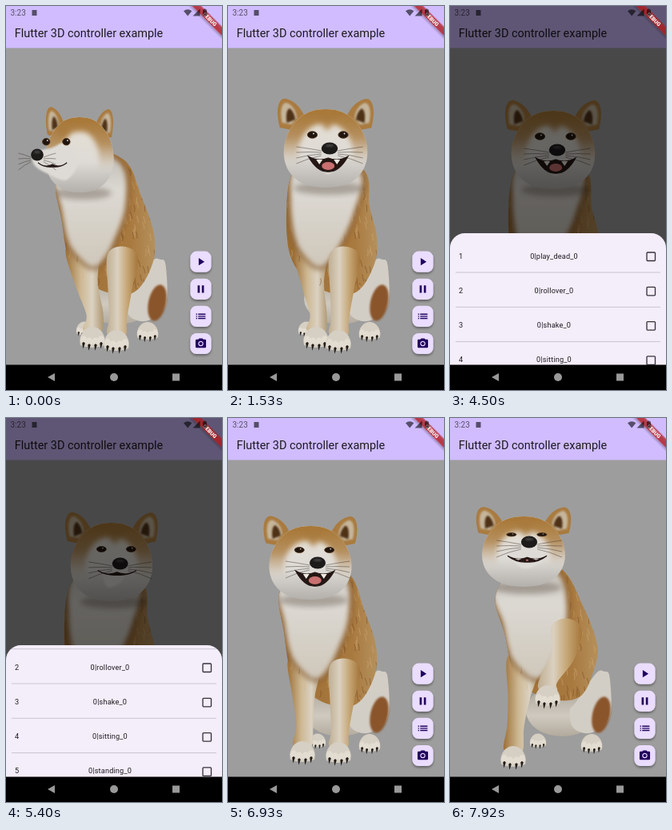
Animation, 270 px wide and 480 px high, one loop 8000 ms. Source, as an HTML page:

```html
<!DOCTYPE html>
<html lang="en">
<head>
<meta charset="utf-8">
<title>3D controller example</title>
<style>
html, body { margin: 0; width: 100%; height: 100%; overflow: hidden; background: #9d9d9d; }
svg { display: block; width: 100%; height: 100%; font-family: Roboto, sans-serif; }
</style>
</head>
<body>
<svg viewBox="0 0 270 480">
  <defs>
    <linearGradient id="coat">
      <stop offset="0" stop-color="#9c6d34"/><stop offset=".75" stop-color="#a97a40"/><stop offset="1" stop-color="#b5905c"/>
    </linearGradient>
    <linearGradient id="crown" x2="0" y2="1">
      <stop offset=".05" stop-color="#a87838"/><stop offset=".35" stop-color="#ad8148" stop-opacity=".85"/><stop offset=".7" stop-color="#b59a76" stop-opacity="0"/>
    </linearGradient>
    <linearGradient id="bib" x2="0" y2="1">
      <stop offset="0" stop-color="#bdb9b3"/><stop offset=".35" stop-color="#dcd9d3"/><stop offset="1" stop-color="#cfc7ba"/>
    </linearGradient>
    <linearGradient id="face" x2="0" y2="1">
      <stop offset="0" stop-color="#e6dfd3"/><stop offset=".6" stop-color="#dedbd6"/><stop offset="1" stop-color="#b3b0ab"/>
    </linearGradient>
    <linearGradient id="nearLeg">
      <stop offset="0" stop-color="#9d7038"/><stop offset=".4" stop-color="#cdb893"/><stop offset=".7" stop-color="#dbd2c2"/><stop offset="1" stop-color="#ae9670"/>
    </linearGradient>
    <linearGradient id="farLeg">
      <stop offset="0" stop-color="#bfae93"/><stop offset=".35" stop-color="#dbd1c0"/><stop offset=".65" stop-color="#c6a777"/><stop offset="1" stop-color="#a47539"/>
    </linearGradient>
    <linearGradient id="rump" x2="0" y2="1">
      <stop offset="0" stop-color="#aaa296"/><stop offset=".6" stop-color="#cfc9bf"/><stop offset="1" stop-color="#b3aa9d"/>
    </linearGradient>
    <filter id="soft" x="-30%" y="-30%" width="160%" height="160%"><feGaussianBlur stdDeviation="3"/></filter>
    <filter id="haze" x="-50%" y="-50%" width="200%" height="200%"><feGaussianBlur stdDeviation="1.3"/></filter>
    <filter id="drop" x="-40%" y="-40%" width="180%" height="180%"><feDropShadow dx="0" dy="2" stdDeviation="1.6" flood-opacity=".38"/></filter>
    <clipPath id="torsoClip"><path id="torsoEdge"/></clipPath>
    <clipPath id="skullClip"><path id="skullEdge"/></clipPath>
    <clipPath id="sheetClip"><rect width="270" height="230" rx="18.4"/></clipPath>
    <g id="ear">
      <path d="M-13 36C-20 10 -13 -2 -5 0C5 2 14 10 20 24L8 40Z" fill="#a97b40"/>
      <path d="M-10 30C-14 12 -9 4 -4 5C3 8 8 14 9 24L2 32Z" fill="#c5b59b" filter="url(#haze)"/>
      <path d="M-4 30C-6 18 -3 12 0 12Q6 17 7 26Z" fill="#4f3319" filter="url(#haze)"/>
    </g>
    <g id="paw"></g>
  </defs>

  <rect width="270" height="480" fill="#9d9d9d"/>

  <g id="dog">
    <use id="pawC" href="#paw"/>
    <ellipse cx="140" cy="366" rx="45" ry="32" fill="url(#rump)"/>
    <path id="rear" fill="#d3cec5"/>
    <ellipse cx="189" cy="371" rx="11" ry="23" fill="#8a552b" filter="url(#haze)" transform="rotate(12 189 371)"/>
    <use id="pawB" href="#paw"/>
    <path id="torso" fill="url(#coat)"/>
    <path id="legL" fill="url(#nearLeg)"/>
    <g clip-path="url(#torsoClip)">
      <g id="fur" fill="none" stroke-width="1.2" opacity=".4"></g>
      <path id="rim" fill="none" stroke="#7d4f20" stroke-width="10" opacity=".6" filter="url(#soft)"/>
      <path id="chest" fill="url(#bib)" filter="url(#soft)"/>
      <ellipse id="chin" fill="#3a2c1c" opacity=".3" filter="url(#soft)"/>
    </g>
    <path id="legR" fill="url(#farLeg)"/>
    <use id="pawL" href="#paw"/>
    <use id="pawR" href="#paw"/>
    <use id="earL" href="#ear"/>
    <use id="earR" href="#ear"/>
    <path id="skull" fill="url(#face)"/>
    <g clip-path="url(#skullClip)">
      <path id="cap" fill="none" stroke="url(#crown)" stroke-width="36" filter="url(#soft)"/>
      <ellipse id="streak" fill="#a87a3d" opacity=".7" filter="url(#soft)"/>
    </g>
    <path id="muzzle" fill="#dedbd6" filter="url(#haze)"/>
    <path id="whiskers" fill="none" stroke="#40382f" stroke-width=".6" opacity=".8"/>
    <g fill="#21150d" stroke="#4b3018" stroke-width=".8"><ellipse id="eyeL"/><ellipse id="eyeR"/></g>
    <g fill="#ddd"><ellipse id="glintL"/><ellipse id="glintR"/></g>
    <path id="mouth" fill="#241714" stroke="#241714" stroke-width="1.2"/>
    <ellipse id="tongue" fill="#c8706f"/>
    <path id="teeth" fill="#efeae2"/>
    <ellipse id="nose" fill="#1d1a1a"/>
    <ellipse id="shine" fill="#5c5a5a" opacity=".7" filter="url(#haze)"/>
  </g>

  <rect width="270" height="52.5" fill="#d0bcff"/>
  <text x="10.8" y="39" font-size="14.44" fill="#1d1b20">Flutter 3D controller example</text>
  <g id="buttons"></g>

  <rect id="scrim" width="270" height="448.5" fill="#000"/>
  <g id="sheet" clip-path="url(#sheetClip)">
    <rect width="270" height="230" fill="#f4edfa"/>
    <g id="rows"></g>
  </g>

  <rect y="448.5" width="270" height="32" fill="#000"/>
  <g fill="#999">
    <path d="M52 464L61 459V469Z"/>
    <circle cx="135" cy="464" r="5"/>
    <rect x="208" y="459.5" width="9" height="9"/>
  </g>
  <g transform="translate(270 0) rotate(45)">
    <rect x="-30" y="18.4" width="60" height="7.9" fill="#b71c1c" fill-opacity=".72" filter="url(#drop)"/>
    <text x="1" y="24.8" font-size="6.7" font-weight="900" fill="#fff" text-anchor="middle">DEBUG</text>
  </g>
  <g opacity=".58">
    <text x="5.5" y="12.2" font-size="10">3:23</text>
    <rect x="32.5" y="5" width="6" height="7"/>
    <path d="M222 6.2Q227.2 2.2 232.4 6.2L227.2 12.6ZM242.5 3.5V12.5H233.5ZM246 4.5h1.5v-1h2v1h1.5v8h-5z"/>
  </g>
</svg>

<script>
const LOOP = 8000, STEP = 90;
const $ = id => document.getElementById(id);
const mix = (a, b, u) => a + (b - a) * u;
const span = (t, a, b) => Math.max(0, Math.min(1, (t - a) / (b - a)));
const ease = u => u * u * (3 - 2 * u);
const set = (id, attrs) => { for (const k in attrs) $(id).setAttribute(k, attrs[k]); };
const draw = (id, d) => set(id, { d });
const oval = (id, cx, cy, rx, ry) => set(id, { cx, cy, rx, ry });
const put = (id, x, y, sx, sy = sx) => set(id, { transform: `translate(${x} ${y}) scale(${sx} ${sy})` });

// Closed Catmull-Rom curve.
function curve(p) {
  const n = p.length, at = i => p[(i + n) % n];
  return 'M' + p[0] + p.map((b, i) => {
    const [a, c, e] = [at(i - 1), at(i + 1), at(i + 2)];
    return `C${b.map((v, k) => v + (c[k] - a[k]) / 6)} ${c.map((v, k) => v - (e[k] - b[k]) / 6)} ${c}`;
  }).join('') + 'Z';
}

// Rounded tube through joints given as [x, y, radius].
function limb(joints) {
  const left = [], right = [], last = joints.length - 1;
  joints.forEach(([x, y, r], i) => {
    const a = joints[Math.max(0, i - 1)], b = joints[Math.min(last, i + 1)];
    const len = Math.hypot(b[0] - a[0], b[1] - a[1]);
    const tx = (b[0] - a[0]) / len * r, ty = (b[1] - a[1]) / len * r;
    if (i === 0) left.push([x - tx * .6, y - ty * .6]);
    left.push([x + ty, y - tx]);
    right.unshift([x - ty, y + tx]);
    if (i === last) left.push([x + tx * .6, y + ty * .6]);
  });
  return curve([...left, ...right]);
}

// A pose: neck lean, head place and turn, mouth and eyes, paws.
const front = {
  neck: 128, x: 129, y: 180, ry: 49, yaw: 5, pitch: 0, open: 1, eye: 1,
  lift: 0, lx: 110, ly: 414, rx: 138, ry2: 418, hind: 98
};
const calm = { ...front, x: 122, y: 178 };
const aside = { ...front, neck: 106, x: 92, y: 186, ry: 47, yaw: -53, open: 0, lx: 108 };
const smile = { ...front, x: 132, yaw: 11, pitch: 2, open: 0, eye: .8 };
const turn = { ...front, neck: 108, x: 103, y: 181, ry: 46, yaw: 9, eye: .8, lx: 93, ly: 417, hind: 112 };
const shake = { ...turn, neck: 98, x: 92, y: 167, ry: 44, yaw: 7, pitch: -12, open: .2, eye: .5,
  lift: 1, lx: 79, ly: 423, rx: 122, ry2: 347, hind: 110 };
const keys = [[0, aside], [200, aside], [1150, calm], [1600, calm], [2900, front], [4600, front],
  [5500, smile], [6400, smile], [6930, turn], [7830, shake], [LOOP, shake]];

function poseAt(t) {
  const i = keys.findIndex(k => k[0] > t), [t0, a] = keys[i - 1], [t1, b] = keys[i];
  const u = ease(span(t, t0, t1)), pose = {};
  for (const k in a) pose[k] = mix(a[k], b[k], u);
  return pose;
}

function drawBody(p) {
  const lean = p.neck - 128, shoulder = 103 + lean * .35;
  const torso = limb([[p.neck, 205, 44], [125 + lean * .25, 253, 52], [133, 303, 55], [150, 338 - 8 * p.lift, 37]]);
  draw('torso', torso);
  draw('torsoEdge', torso);
  const chest = limb([[p.neck - 3, 205, 42], [118 + lean * .4, 252, 40], [113 + lean * .3, 295, 28], [115 + lean * .2, 318, 12]]);
  draw('chest', chest);
  draw('rim', chest);
  draw('rear', limb([[191, 322, 9], [179, 364, 23], [163, 380, 19]]));
  draw('legL', limb([[shoulder, 302, 21], [mix(shoulder, p.lx, .45), 348, 14], [p.lx + 3, 385, 10.5], [p.lx, p.ly - 8, 12]]));
  const sy = mix(312, 262, p.lift), sx = 146, down = u => mix(sy, p.ry2, u);
  draw('legR', limb([[sx, sy, 19], [mix(sx, p.rx, .45) + 6 * p.lift, down(.4), 15], [p.rx + 2, down(.75), 11], [p.rx, p.ry2 - 8, 12]]));
  put('pawL', p.lx, p.ly, 1);
  put('pawR', p.rx, p.ry2, 1);
  put('pawB', 177, 406, .85);
  put('pawC', p.hind, 403, .65);
}

function drawHead(p) {
  const { x, y, ry, yaw, open } = p, side = Math.abs(yaw), k = ry / 49, rx = 53 - side * .2;
  const pow = v => Math.sign(v) * Math.abs(v) ** .85;
  const ring = Array.from({ length: 20 }, (_, i) => {
    const c = Math.cos(i * Math.PI / 10), s = Math.sin(i * Math.PI / 10);
    return [x + rx * pow(c) * (1 + .09 * s), y + ry * s];
  });
  for (const id of ['skull', 'skullEdge', 'cap']) draw(id, curve(ring));
  oval('streak', x + yaw * .4, y - 36 * k, 7, 13);
  oval('chin', x + 4, y + ry + 1, rx * .85, 8);

  const earGap = 46 - side * .27, earWidth = 1 - side / 150;
  put('earL', x - earGap, y - 62 * k, earWidth, k);
  put('earR', x + earGap, y - 62 * k + side * .05, -earWidth, k);

  const nx = x + yaw, ny = y + p.pitch, noseW = 10.5 - side * .05;
  draw('muzzle', limb([[x + yaw * .3, y + 8, 24 * k], [mix(x, nx, .7), ny + 8, 17 * k], [nx, ny + 5, 10]]));
  oval('nose', nx, ny, noseW, 7.5);
  oval('shine', nx, ny - 3.5, noseW / 2, 1.5);

  const ex = x + yaw * .55, ey = y - 17 * k + p.pitch * .5, gap = 20 - side * .14;
  for (const [s, dir] of [['L', -1], ['R', 1]]) {
    oval('eye' + s, ex + dir * gap, ey, 6.3 - side * .03, 4.3 * p.eye);
    oval('glint' + s, ex + dir * gap + 1.5, ey - 1.5 * p.eye, .9, .9 * p.eye);
  }

  // Upper lip sags in the middle; the jaw drops below it.
  const mx = x + yaw * .64, my = y + p.pitch * .4 + 10, half = 25.5 - side * .14, jaw = 1 + 14 * open;
  draw('mouth', `M${mx - half} ${my}Q${mx - half / 2} ${my + 7} ${mx} ${my + 2}Q${mx + half / 2} ${my + 7} ${mx + half} ${my}` +
    `Q${mx + half * .55} ${my + 5 + jaw} ${mx} ${my + 4 + jaw}Q${mx - half * .55} ${my + 5 + jaw} ${mx - half} ${my}Z`);
  oval('tongue', mx, my + 4 + 8 * open, 8 * open, 5 * open);
  draw('teeth', [-11, 11].map(o => `M${mx + o - 4} ${my + 4}h8l-4 ${6 * open}Z`).join(''));

  let hairs = '';
  const long = 33 * (1 - side / 100);
  for (const dir of [-1, 1]) for (let i = 0; i < 4; i++)
    hairs += `M${nx + dir * noseW} ${ny + 3 + i * 2}q${dir * long / 2} ${i * 2 - 3} ${dir * long} ${i * 5 - 5}`;
  draw('whiskers', hairs);
}

function drawSheet(t) {
  const up = 1 - (1 - span(t, 4100, 4400)) ** 3;
  const shown = t < 6000 ? up : 1 - span(t, 6230, 6440) ** 2;
  set('scrim', { opacity: .54 * shown });
  put('sheet', 0, mix(449, 284, shown), 1);
  $('sheet').style.display = shown > 0 ? '' : 'none';
  put('rows', 0, -52.5 * ease(span(t, 4860, 5580)), 1);
  set('splash', { opacity: span(t, 6120, 6300) * .7 });
}

function build() {
  let toes = '<path fill="#d6cfc3" d="M-15 10C-18 -2 -10 -13 0 -13C10 -13 18 -2 15 10Q0 16 -15 10Z"/>';
  for (const x of [-11, -4, 4, 11]) {
    const y = 10 - x * x / 50;
    toes += `<ellipse cx="${x}" cy="${y - 4}" rx="4.2" ry="5.5" fill="#e2dcd1"/>
      <path d="M${x - 1.8} ${y}Q${x} ${y - 3} ${x + 1.8} ${y}L${x - .6} ${y + 7}Z" fill="#221c18"/>`;
  }
  $('paw').innerHTML = toes;

  let seed = 7, fur = '';
  const rnd = (a, b) => a + (b - a) * ((seed = seed * 16807 % 2147483647) / 2147483647);
  for (let i = 0; i < 160; i++)
    fur += `<path d="M${rnd(62, 195)} ${rnd(195, 355)}q${rnd(0, 3)} 4 ${rnd(-1, 3)} 9" stroke="${i % 2 ? '#d3b080' : '#74471c'}"/>`;
  $('fur').innerHTML = fur;

  const icons = ['M8 5v14l11-7z', 'M6 19h4V5H6zM14 5v14h4V5z',
    [7, 11, 15].map(y => `M3 ${y}h2v2H3zM7 ${y}h14v2H7z`).join(''),
    'M9 2L7.2 4H4a2 2 0 0 0-2 2v12a2 2 0 0 0 2 2h16a2 2 0 0 0 2-2V6a2 2 0 0 0-2-2h-3.2L15 2zM12 7a5 5 0 1 1-.01 0zM12 8.8a3.2 3.2 0 1 0 .01 0z'];
  $('buttons').innerHTML = icons.map((d, i) =>
    `<g transform="translate(243.5 ${319.7 + i * 34.1})" fill="#21005d">
      <rect x="-13.1" y="-13.1" width="26.2" height="26.2" rx="7.9" fill="#eaddff" filter="url(#drop)"/>
      <path d="${d}" fill-rule="evenodd" transform="scale(.656) translate(-12 -12)"/></g>`).join('');

  const clips = ['play_dead', 'rollover', 'shake', 'sitting', 'standing'];
  $('rows').innerHTML = '<rect id="splash" x="88" y="99" width="114" height="30" rx="10" fill="#d9d3dc" filter="url(#soft)"/>' +
    clips.map((name, i) => `<g transform="translate(0 ${28.5 + i * 43.3})" font-size="9.18" letter-spacing=".16" fill="#1d1b20">
      <text x="11" y="3">${i + 1}</text>
      <text x="130" y="3" text-anchor="middle">0|${name}_0</text>
      <rect x="246" y="-4.5" width="10.5" height="10.5" rx="1" fill="none" stroke="#37333c" stroke-width="1.35"/>
      <path d="M7 20.5H263" stroke="#cac4d0"/></g>`).join('');
}

build();
const start = performance.now();
(function tick() {
  const t = Math.floor((performance.now() - start) % LOOP / STEP) * STEP;
  const pose = poseAt(t);
  drawBody(pose);
  drawHead(pose);
  drawSheet(t);
  requestAnimationFrame(tick);
})();
</script>
</body>
</html>
```
